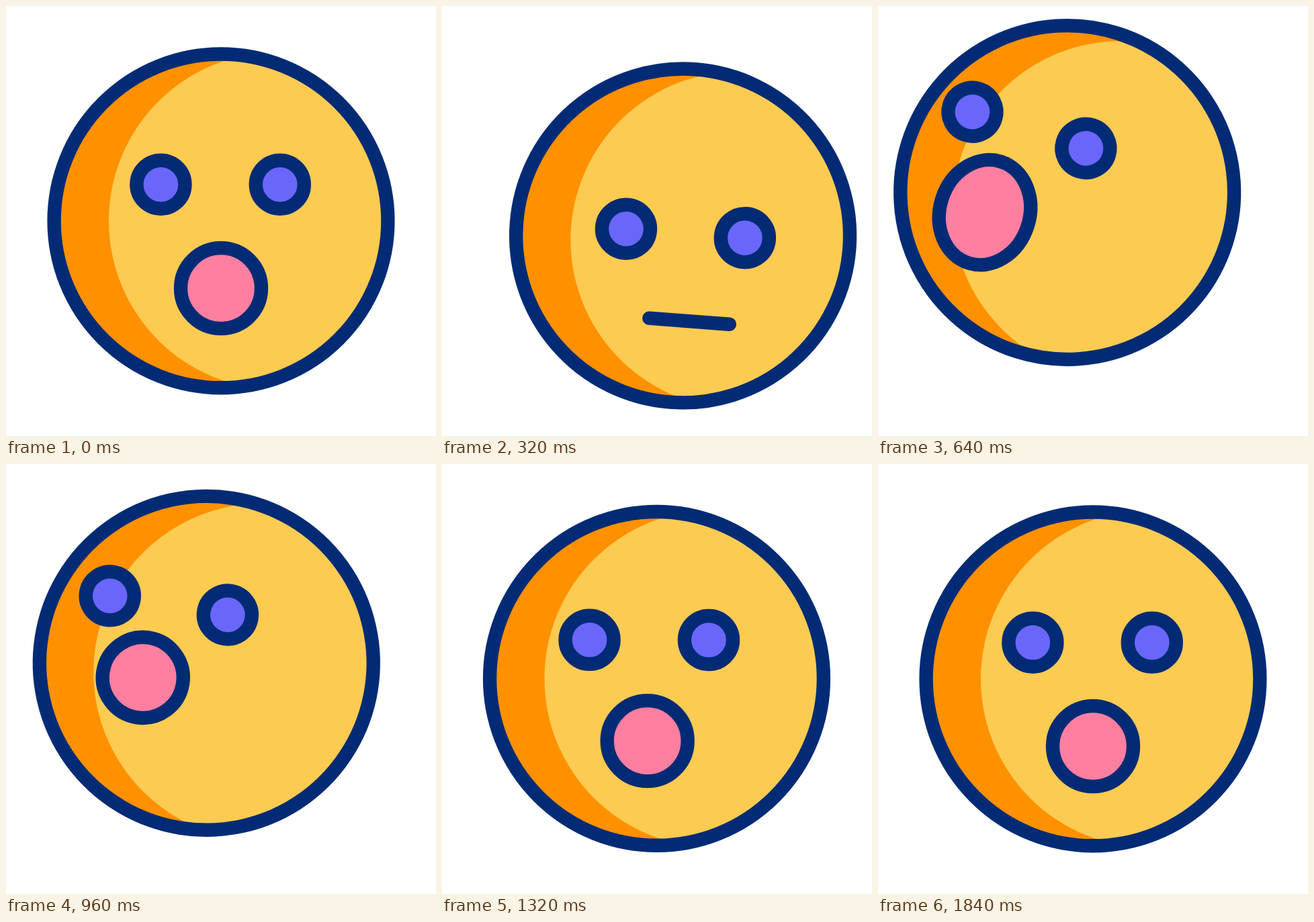
An HTML page with a canvas that plays this animation: 640x640 px, repeating every 2 s.

```html
<!DOCTYPE html>
<html lang="en">
<head>
<meta charset="utf-8">
<title>Surprised face</title>
<style>
  html, body { margin: 0; width: 100%; height: 100%; overflow: hidden; background: #fff; }
  canvas { display: block; width: 100vmin; height: 100vmin; }
</style>
</head>
<body>
<canvas id="stage" width="640" height="640"></canvas>
<script>
const LOOP = 2000, STEP = 40, LINE = 20.4;
const NAVY = '#032b75', YELLOW = '#fdcb51', ORANGE = '#ff9100';
const VIOLET = '#6b66fa', PINK = '#ff7fa1';
const ctx = document.getElementById('stage').getContext('2d');

// Eased progress from 0 to 1 between two times.
function ease(t, from, to) {
  const u = Math.min(1, Math.max(0, (t - from) / (to - from)));
  return u * u * (3 - 2 * u);
}

// The face leans down right, swings up left, then settles; features trail the head.
function pose(t) {
  const go = (from, to) => ease(t, from, to);
  const dip = go(0, 256), sink = go(0, 350);
  const settle = go(600, 1370), follow = go(781, 1475);
  const open = go(320, 592), relax = go(620, 900);
  return {
    head: {
      x: 44 * dip - 83.5 * go(257, 665) + 39.5 * settle,
      y: 27 * dip - 70 * go(255, 655) + 43 * settle,
      turn: 18.1 * (go(180, 620) - go(580, 1345))
    },
    eyes: {
      x: 25 * dip - 106.5 * go(237, 532) + 81.5 * follow,
      y: 51.5 * sink - 77.5 * go(391, 708) + 26 * follow,
      ry: 36 * (1 - go(1600, 1720) + go(1720, 1840))
    },
    mouth: {
      x: 36 * dip - 143.8 * go(252, 570) + 107.8 * follow,
      y: 26.5 * sink - 96.5 * go(418, 795) + 70 * go(854, 1438),
      rx: 60 + 7 * (open - relax),
      ry: 60 * (1 - dip) + 79.5 * open - 19.5 * relax
    }
  };
}

function disc(x, y, r, color) {
  ctx.beginPath();
  ctx.arc(x, y, r, 0, 2 * Math.PI);
  ctx.fillStyle = color;
  ctx.fill();
}

function ring(x, y, rx, ry, color) {
  ctx.beginPath();
  if (ry < 0.5) {
    ctx.moveTo(x - rx, y);
    ctx.lineTo(x + rx, y);
  } else {
    ctx.ellipse(x, y, rx, ry, 0, 0, 2 * Math.PI);
    ctx.fillStyle = color;
    ctx.fill();
  }
  ctx.stroke();
}

function draw(t) {
  const { head, eyes, mouth } = pose(t);
  ctx.fillStyle = '#fff';
  ctx.fillRect(0, 0, 640, 640);
  ctx.strokeStyle = NAVY;
  ctx.lineWidth = LINE;
  ctx.lineCap = ctx.lineJoin = 'round';

  ctx.save();
  ctx.translate(320 + head.x, 319.9 + head.y);
  ctx.rotate(head.turn * Math.PI / 180);

  disc(0, 0, 248, ORANGE);
  ctx.save();
  ctx.clip();
  disc(84, 0, 251, YELLOW);
  ctx.restore();
  ctx.beginPath();
  ctx.arc(0, 0, 248.4, 0, 2 * Math.PI);
  ctx.stroke();

  for (const side of [-1, 1]) {
    ring(side * 88.7 - 0.9 + eyes.x, -54.2 + eyes.y, 36, eyes.ry, VIOLET);
  }
  ring(mouth.x, 100.2 + mouth.y, mouth.rx, mouth.ry, PINK);
  ctx.restore();
}

const start = performance.now();
function tick() {
  const t = (performance.now() - start) % LOOP;
  draw(Math.floor(t / STEP) * STEP);
  requestAnimationFrame(tick);
}
tick();
</script>
</body>
</html>
```
